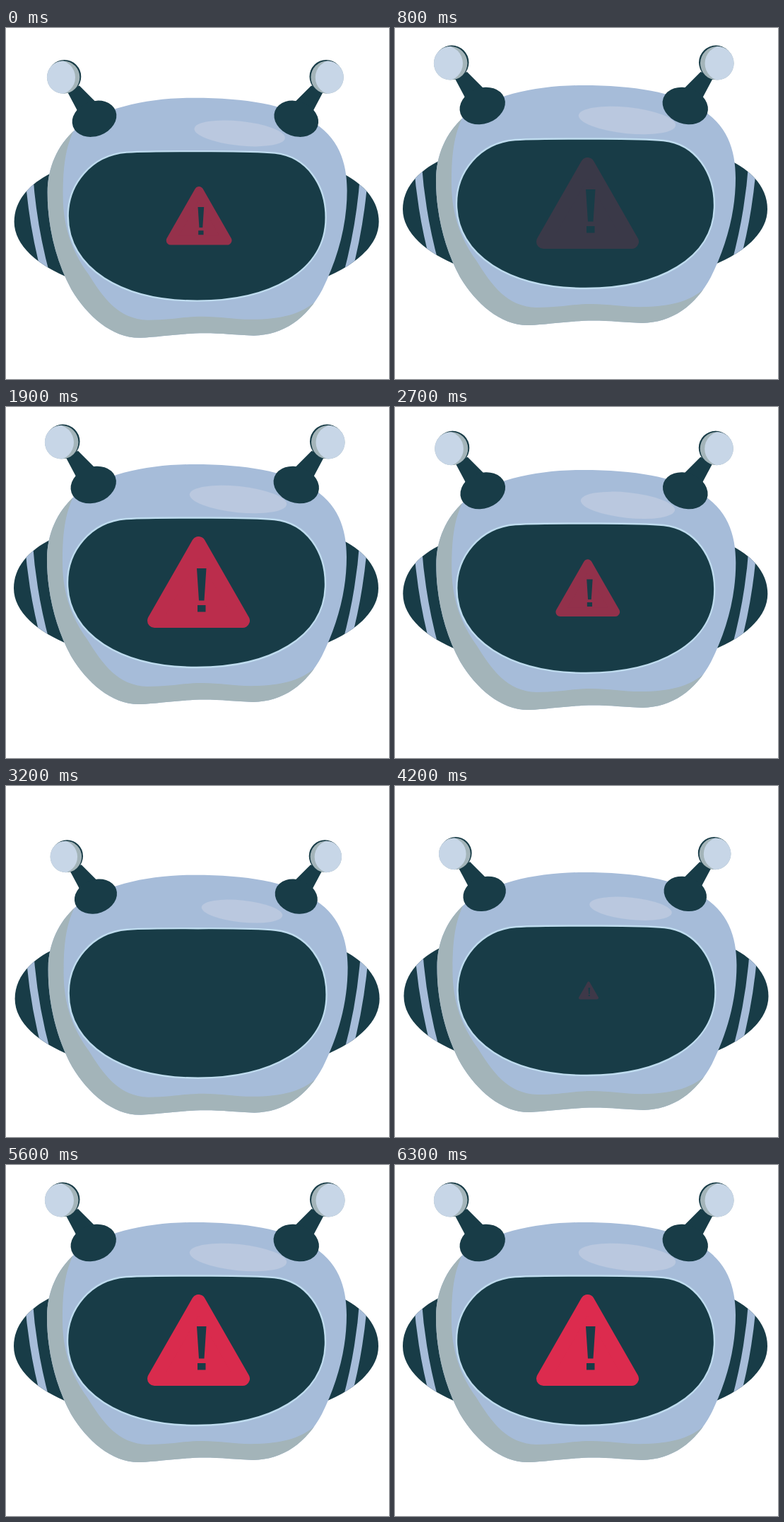
Animation, 542 px wide and 496 px high, one loop 6.4 s. Source, as an HTML page:

```html
<!DOCTYPE html>
<html lang="en">
<head>
<meta charset="utf-8">
<title>Robot alert</title>
<style>
  html, body { margin: 0; width: 100%; height: 100%; overflow: hidden; background: #fff; }
  svg { display: block; width: 100%; height: 100%; }
  .dark { fill: #183c47; }
  .light { fill: #a6bcd9; }
  .shade { fill: #a3b4b9; }
  .ball { fill: #c7d6e7; }
</style>
</head>
<body>
<svg viewBox="0 0 542 496">
  <defs>
    <path id="shell" d="M265 81C340 81 395 91 430 113C470 135 482 172 482 212C482 262 468 310 447 352C425 393 392 416 350 417C325 416 305 413.500 280 413.500C250 413.500 215 419 190 420C150 421 115 390 92 352C70 312 58 262 58 215C58 180 72 148 97 126C135 95 200 81 265 81Z"/>
    <path id="earShape" d="M66 186C30 203 11 228 11 256C11 290 45 318 90 336Z"/>
    <clipPath id="shellClip"><use href="#shell"/></clipPath>
    <clipPath id="earClip"><use href="#earShape"/></clipPath>
    <clipPath id="ballClip"><circle cx="78.700" cy="49.800" r="23.800"/></clipPath>
    <g id="ear">
      <use href="#earShape" class="dark"/>
      <path d="M32 190Q37 262 56 332" fill="none" stroke="#a6bcd9" stroke-width="11" clip-path="url(#earClip)"/>
    </g>
    <g id="antenna">
      <path class="dark" d="M83 68L100 100L128 88L102 62Z"/>
      <ellipse class="dark" cx="123.700" cy="110" rx="33" ry="25.300" transform="rotate(-20 123.700 110)"/>
      <circle class="dark" cx="80.300" cy="48.800" r="24.200"/>
      <g clip-path="url(#ballClip)">
        <circle class="shade" cx="79" cy="49.500" r="25"/>
        <circle class="ball" cx="71" cy="50" r="25"/>
      </g>
    </g>
  </defs>
  <g id="head">
    <use href="#ear"/>
    <use href="#ear" transform="translate(538) scale(-1 1)"/>
    <use href="#shell" class="light"/>
    <path class="shade" clip-path="url(#shellClip)" d="M98 122C82 150 80 185 80 220C80 265 94 300 116 330C136 362 158 394 200 395C235 395 250 390 278 390C305 390 325 395 355 394C395 393 420 384 438 368L450 440L40 440L40 122Z"/>
    <ellipse id="glare" cx="328.500" cy="130.500" rx="69" ry="18.500" fill="#bac8df"/>
    <path class="dark" stroke="#bfdcef" stroke-width="2.400" d="M270 156.500C310 156.500 350 156 380 159C426 164 452 205 452 250C452 327 372 368 270 368C163 368 87 322 87 248C87 204 119 162 170 158C205 156 235 156.500 270 156.500Z"/>
    <g id="alert">
      <path d="M272.500 193L335 302H210Z" fill="#dc2b4e" stroke="#dc2b4e" stroke-width="20" stroke-linejoin="round"/>
      <path class="dark" d="M270 228H283.500L280.500 273.500H273ZM271 280H282.500V289.500H271Z"/>
    </g>
    <use id="left" href="#antenna"/>
    <use id="right" href="#antenna"/>
  </g>
</svg>
<script>
  const LOOP = 6400, STEP = 100, CYCLE = 4500, LEAD = 700, DROP = 53;
  const RISE = 76, FALL = 3140, MOVE = 1026;
  const GROW = 110, GROW_LEN = 1000, SHRINK_LEN = 620;
  const BLINK = 1150, BLINK_LEN = 675, BLINKS = 3, DIM = 0.17;

  const el = id => document.getElementById(id);
  const set = (id, value) => el(id).setAttribute('transform', value);
  const wave = u => (1 - Math.cos(Math.PI * u)) / 2;
  const ease = (t, start, length) => wave(Math.min(1, Math.max(0, (t - start) / length)));
  const scaleAt = (x, y, s) => `translate(${x} ${y}) scale(${s}) translate(${-x} ${-y})`;

  function blink(t) {
    const n = (t - BLINK) / BLINK_LEN;
    return n < 0 || n > BLINKS ? 1 : 1 - (1 - DIM) * wave(2 * n);
  }

  function draw(time) {
    const t = (time + LEAD) % CYCLE;
    const y = DROP * (1 - ease(t, RISE, MOVE) + ease(t, FALL, MOVE));
    const size = ease(t, GROW, GROW_LEN) - ease(t, FALL, SHRINK_LEN);
    const squash = scaleAt(149, 133, 1 - 0.00146 * y);

    set('head', `translate(${0.036 * y} ${y})`);
    set('left', squash);
    set('right', `translate(534.5) scale(-1 1) ${squash}`);
    set('glare', `${scaleAt(352, 142, 1 - 0.0037 * y)} rotate(6 328.5 130.5)`);
    set('alert', scaleAt(272.5, 248, size));
    el('alert').setAttribute('opacity', size * blink(t));
  }

  const begin = performance.now();
  function tick() {
    const time = (performance.now() - begin) % LOOP;
    draw(Math.floor(time / STEP) * STEP);
    requestAnimationFrame(tick);
  }
  tick();
</script>
</body>
</html>
```
